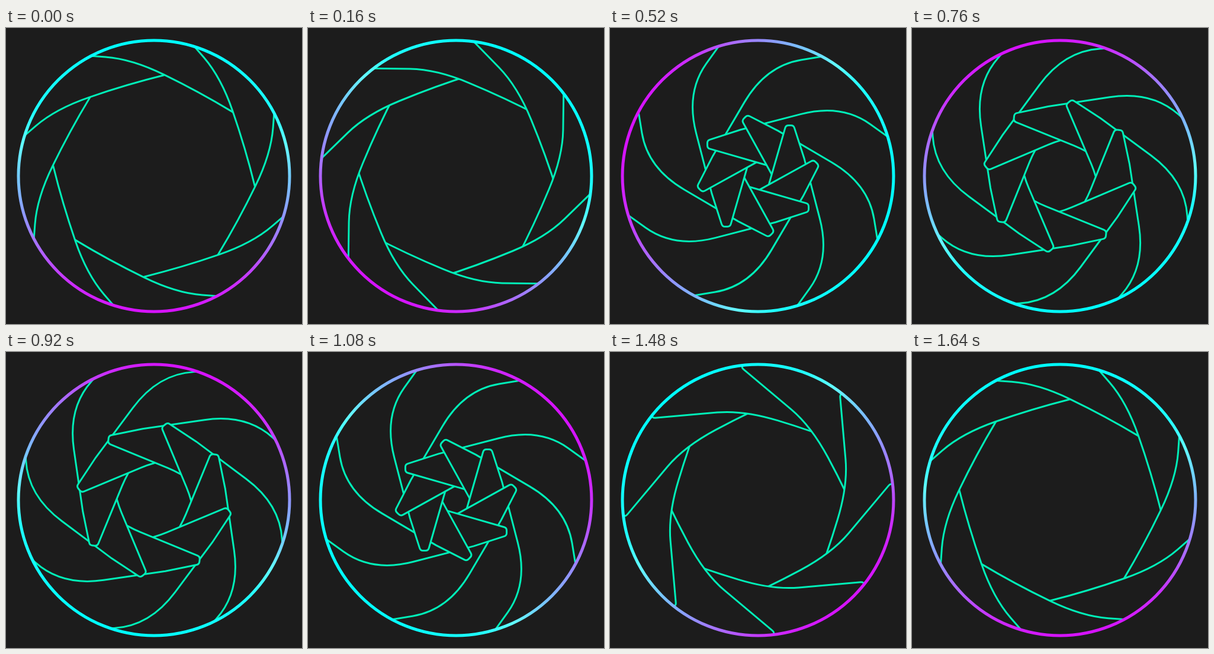
Animation, 500 px wide and 500 px high, one loop 1680 ms. Source, as an HTML page with a canvas:

```html
<!DOCTYPE html>
<html lang="en">
<head>
<meta charset="utf-8">
<title>Aperture</title>
<style>
  html, body { margin: 0; width: 100%; height: 100%; overflow: hidden; background: #1c1c1c; }
  canvas { display: block; }
</style>
</head>
<body>
<canvas id="stage" width="500" height="500"></canvas>
<script>
const ctx = document.getElementById('stage').getContext('2d');
const LOOP = 1680, STEP = 40, BLADES = 8, CENTER = 250, RADIUS = 229;
const PIVOT = { x: 610, y: 250 };

// Blade swing in degrees: [time, angle]
const KEYS = [[0, 33.1], [560, -0.3], [840, 7], [1120, -0.3], [1680, 33.1]];

const STOPS = [[0, '#00ffff'], [0.26, '#1effff'], [0.38, '#60faff'], [0.5, '#74ccff'],
  [0.62, '#8aa0ff'], [0.76, '#aa6cff'], [0.9, '#cc2cff'], [1, '#d612ff']];

const blade = new Path2D();
blade.moveTo(600, 498);
blade.lineTo(460, 367.5);
blade.quadraticCurveTo(412, 322.7, 360, 282.3);
blade.quadraticCurveTo(312.9, 245.5, 270, 233);
blade.arcTo(164.5, 202.5, 164.5, 189.5, 6);
blade.arcTo(164.5, 189.5, 220, 171.7, 6);
blade.lineTo(220, 171.7);
blade.lineTo(322, 145.4);
blade.quadraticCurveTo(391, 127.5, 440, 162.5);
blade.lineTo(560, 249);
blade.closePath();

// Cubic bezier easing (0.6, 0, 0.5, 1)
function ease(x) {
  let lo = 0, hi = 1, s = 0.5;
  for (let i = 0; i < 24; i++) {
    s = (lo + hi) / 2;
    const bx = 1.8 * s * (1 - s) ** 2 + 1.5 * s * s * (1 - s) + s ** 3;
    if (bx < x) lo = s; else hi = s;
  }
  return s * s * (3 - 2 * s);
}

function swingAt(time) {
  const i = KEYS.findIndex(key => time < key[0]);
  const [t0, a0] = KEYS[i - 1], [t1, a1] = KEYS[i];
  return a0 + (a1 - a0) * ease((time - t0) / (t1 - t0));
}

function placedBlade(index, swing) {
  const m = new DOMMatrix()
    .translate(CENTER, CENTER).rotate(index * 360 / BLADES).translate(-CENTER, -CENTER)
    .translate(PIVOT.x, PIVOT.y).rotate(swing).translate(-PIVOT.x, -PIVOT.y);
  const path = new Path2D();
  path.addPath(blade, m);
  return path;
}

function drawBlades(swing) {
  const paths = Array.from({ length: BLADES }, (_, i) => placedBlade(i, swing));
  ctx.strokeStyle = '#00efb8';
  ctx.lineWidth = 3;
  paths.forEach((path, i) => {
    ctx.save();
    ctx.beginPath();
    ctx.arc(CENTER, CENTER, RADIUS, 0, 2 * Math.PI);
    ctx.clip();
    // Each blade lies under the next three
    for (let k = 1; k <= 3; k++) {
      const outside = new Path2D();
      outside.rect(-1000, -1000, 2500, 2500);
      outside.addPath(paths[(i + k) % BLADES]);
      ctx.clip(outside, 'evenodd');
    }
    ctx.stroke(path);
    ctx.restore();
  });
}

function drawRing(turn) {
  const dx = RADIUS * Math.sin(turn), dy = -RADIUS * Math.cos(turn);
  const paint = ctx.createLinearGradient(CENTER + dx, CENTER + dy, CENTER - dx, CENTER - dy);
  STOPS.forEach(([at, color]) => paint.addColorStop(at, color));
  ctx.strokeStyle = paint;
  ctx.lineWidth = 5;
  ctx.beginPath();
  ctx.arc(CENTER, CENTER, RADIUS, 0, 2 * Math.PI);
  ctx.stroke();
}

function draw() {
  const time = Math.floor(performance.now() % LOOP / STEP) * STEP;
  ctx.fillStyle = '#1c1c1c';
  ctx.fillRect(0, 0, 500, 500);
  drawBlades(swingAt(time));
  drawRing(time / LOOP * 2 * Math.PI);
  requestAnimationFrame(draw);
}
draw();
</script>
</body>
</html>
```
